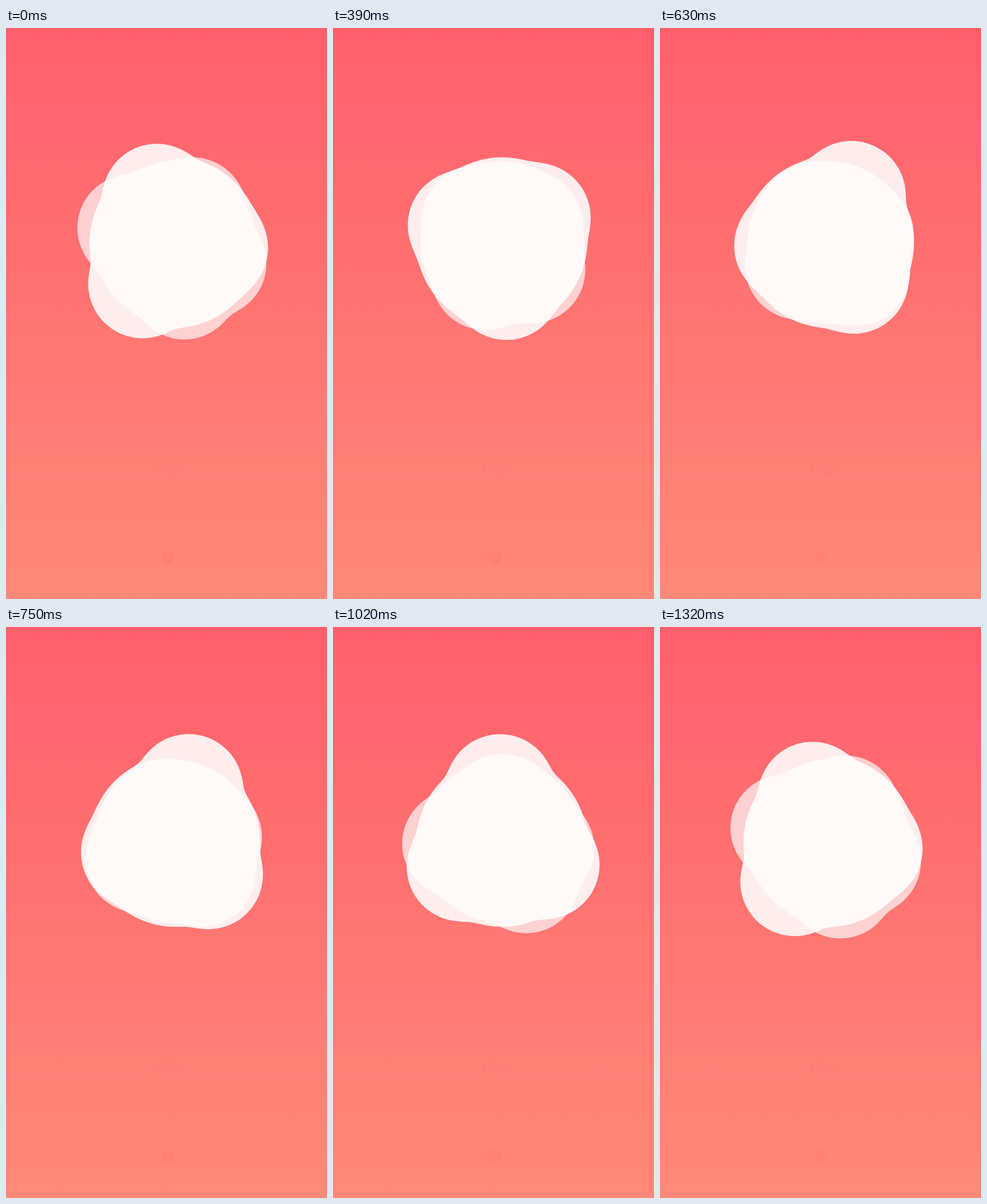
Recreate the animation shown at these times as an HTML page. Size 561 px wide and 998 px high, loop 1350 ms.

```html
<!DOCTYPE html>
<html lang="en">
<head>
<meta charset="utf-8">
<title>Login</title>
<style>
  html, body { margin: 0; width: 100%; height: 100%; overflow: hidden; }
  body { background: linear-gradient(#ff5f6b, #ff8a78); }
  svg { display: block; width: 561px; height: 998px; }
  path { fill: #fff; }
  text { font: bold 21px "Liberation Serif", serif; fill: #ff7c75; text-anchor: middle; }
</style>
</head>
<body>
<svg viewBox="0 0 561 998">
  <path id="back" fill-opacity=".68"/>
  <path id="front" fill-opacity=".88"/>
  <text x="287" y="778">Login</text>
  <circle cx="283" cy="924" r="11.5" fill="#ff8075"/>
</svg>
<script>
const LOOP = 1350, STEP = 30, CX = 295, CY = 375, TAU = Math.PI * 2;
const SOFT = 4, POINTS = 144;
const { sin, cos, sqrt, exp, log, max } = Math;

// A blob is a core circle with round lobes travelling about it. Every loop
// each lobe moves on to the start of the next one; w is its phase on the
// whole tour and s counts the loops along it. Angles are in degrees.
const blobs = [
  {
    path: document.getElementById('back'), lobes: 4, core: 142, size: 93,
    angle: (s, w) => 196 + 90 * s + 17 * sin(w - .22) - 9.7 * sin(2 * w - .88) - 4.5 * sin(3 * w + .29),
    reach: w => 69 - 8.7 * sin(w) + 3.9 * cos(2 * w) + 3 * cos(3 * w + .55) + 7 * cos(4 * w + .53)
  },
  {
    path: document.getElementById('front'), lobes: 3, core: 149, size: 95,
    angle: s => 239.5 - 120 * s + 8.5 * cos(TAU * (s - .02)),
    reach: w => 81.3 + 2 * cos(w) - 8 * sin(2 * w - .29) - 6.2 * sin(3 * w) + 6 * sin(4 * w - .31)
  }
];

function lobesAt(blob, progress) {
  return Array.from({ length: blob.lobes }, (_, k) => {
    const s = progress + k, w = TAU * s / blob.lobes;
    return { angle: blob.angle(s, w) * TAU / 360, reach: blob.reach(w) };
  });
}

// Distance from the blob's centre to the far side of a lobe.
function farSide({ angle, reach }, size, theta) {
  const across = reach * sin(theta - angle);
  return reach * cos(theta - angle) + sqrt(max(0, size * size - across * across));
}

function outline(blob, progress) {
  const lobes = lobesAt(blob, progress);
  const points = Array.from({ length: POINTS }, (_, i) => {
    const theta = i / POINTS * TAU;
    // Soft maximum rounds the joins between lobes and core.
    const sum = lobes.reduce((a, lobe) =>
      a + exp((farSide(lobe, blob.size, theta) - blob.core) / SOFT), 1);
    const r = blob.core + SOFT * log(sum);
    return (CX + r * cos(theta)).toFixed(2) + ' ' + (CY + r * sin(theta)).toFixed(2);
  });
  return 'M' + points.join('L') + 'Z';
}

let shown = -1;
function draw() {
  const t = Math.floor(performance.now() % LOOP / STEP) * STEP;
  if (t !== shown) {
    shown = t;
    for (const blob of blobs) blob.path.setAttribute('d', outline(blob, t / LOOP));
  }
  requestAnimationFrame(draw);
}
draw();
</script>
</body>
</html>
```
